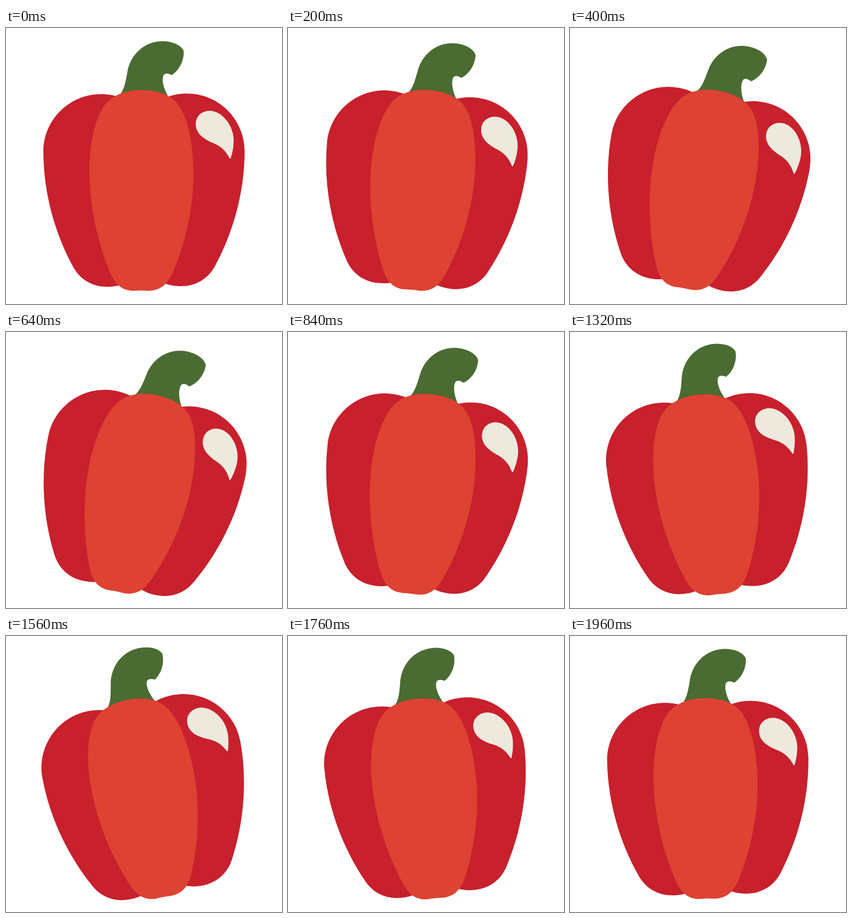
Recreate the animation shown at these times as an HTML page. Size 480 px wide and 480 px high, loop 2 s.

```html
<!DOCTYPE html>
<html>
<head>
<meta charset="utf-8">
<style>
  html, body { margin: 0; height: 100%; overflow: hidden; background: #fff; }
  svg { display: block; width: 100%; height: 100%; }
</style>
</head>
<body>
<svg viewBox="0 0 480 480">
  <g id="pepper">
    <path fill="#4a6b32" d="M197 117C206 107 208 93 211 77C216 46 241 23 272 23C290 23 305 30 309 40C310 57 301 74 288 82C283 79 277 78 274 82C270 91 275 108 284 122L240 140Z"/>
    <g fill="#c8202d">
      <path id="lobe" d="M206 124C192 117 178 115 165 115C110 115 65 160 65 215C65 290 87 360 115 412C127 437 150 450 175 450C186 450 193 449 205 445Z"/>
      <use href="#lobe" transform="translate(480 -1) scale(-1 1)"/>
    </g>
    <path fill="#de4232" d="M235 108C262 108 284 115 297 130C317 153 326 205 326 252C326 320 309 382 290 425C280 447 268 457 246 457Q236 456 222 457C203 457 190 447 181 425C160 375 145 310 145 250C145 205 153 165 167 141C180 118 206 108 235 108Z"/>
    <path fill="#ede9dd" d="M389 227C383 215 375 206 360 200C341 192 330 182 330 167C330 153 341 144 354 144C376 144 396 170 396 195C396 208 393 220 391 226Q390 228 389 227Z"/>
  </g>
</svg>
<script>
  const LOOP = 2000, STEP = 40;
  // [time in ms, tilt in degrees], joined by straight ramps
  const keys = [[0, 0], [550, 13.8], [1525, -11.2], [LOOP, 0]];
  const pepper = document.getElementById('pepper');

  function tilt(t) {
    const i = keys.findIndex(k => k[0] > t);
    const [t0, a0] = keys[i - 1], [t1, a1] = keys[i];
    return a0 + (a1 - a0) * (t - t0) / (t1 - t0);
  }

  function draw() {
    const t = Math.floor(performance.now() % LOOP / STEP) * STEP;
    pepper.setAttribute('transform', `rotate(${tilt(t)} 240 240)`);
    requestAnimationFrame(draw);
  }
  draw();
</script>
</body>
</html>
```
